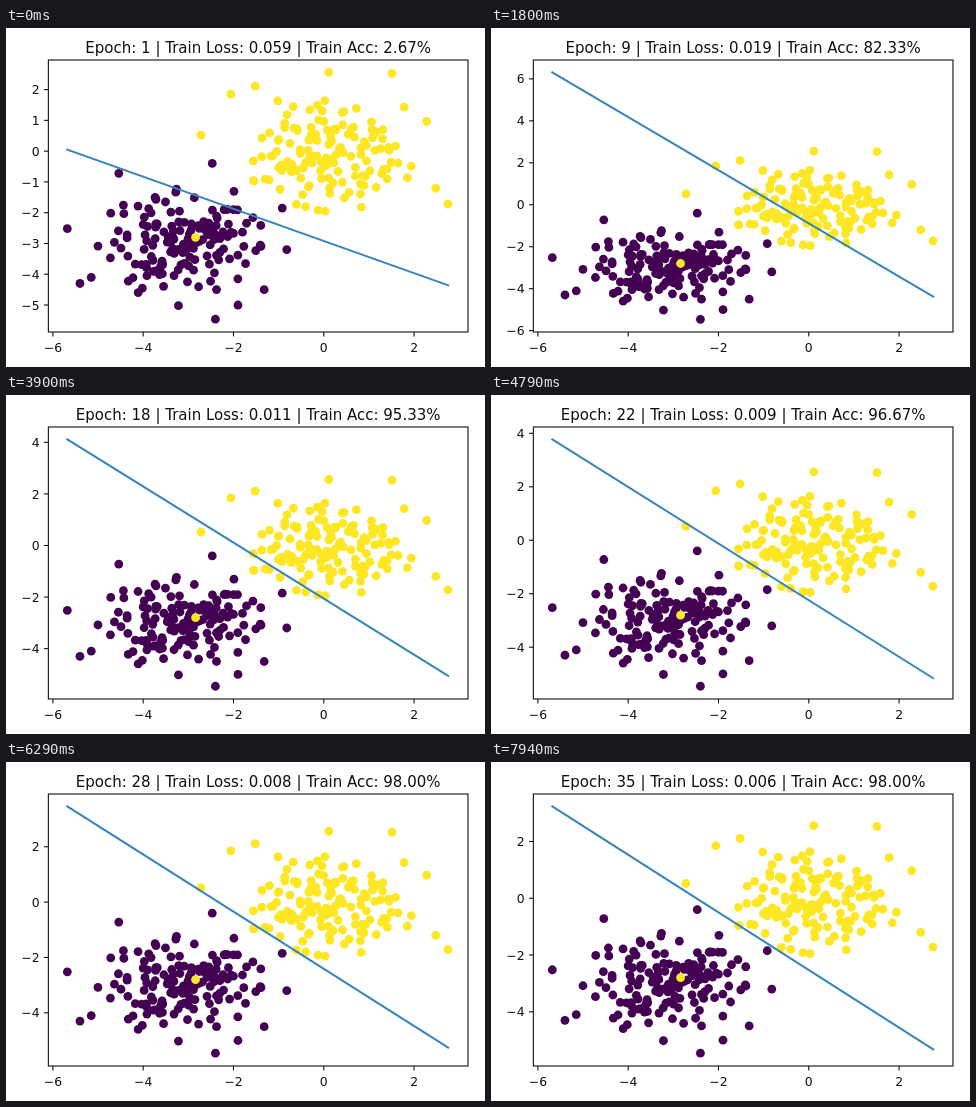
These frames come from a looping animation (479x339 px, 8 s). An HTML page with a canvas:

```html
<!DOCTYPE html>
<html lang="en">
<head>
<meta charset="utf-8">
<title>Training a linear classifier</title>
<style>
  html, body { margin: 0; width: 100%; height: 100%; overflow: hidden; background: #fff; }
  canvas { display: block; }
</style>
</head>
<body>
<canvas id="plot" width="479" height="339"></canvas>
<script>
const ctx = document.getElementById('plot').getContext('2d');

const LOOP = 8000, STEP = 149.67, STEPS_PER_EPOCH = 1.54, STEP_OFFSET = 0.65;
const TOP = 32, BOTTOM = 304, AXES_WIDTH = 419.6;
const X_MIN = -6.1, X_SCALE = 45.15, LINE_X = [-5.68, 2.755];
const DATA_LOW = -5.475, DATA_HIGH = 2.56;
const INK = '#111';
const LABEL_FONT = '12.4px "DejaVu Sans", sans-serif';
const TITLE_FONT = '15px "DejaVu Sans", sans-serif';

// The boundary turns over during the first epochs, then settles smoothly.
const EARLY_LINES = [[0.05, -4.36], [-4.8, -5.3], [-166, -31]];
const ACCURACY_KEYS = [[1, 2.67], [3, 49], [5, 53.33], [9, 82.33], [14, 93.33],
  [22, 96.67], [28, 98], [35, 98]];

function lineEnds(epoch) {
  const decay = 1 / (epoch - 2);
  return EARLY_LINES[epoch - 1] || [2.41 + 27.3 * decay, -5.58 + 8.4 * decay];
}

const lossAt = epoch => 0.2325 / (epoch + 2.95);

function accuracyAt(epoch) {
  const next = Math.max(1, ACCURACY_KEYS.findIndex(([e]) => e >= epoch));
  const [e0, a0] = ACCURACY_KEYS[next - 1], [e1, a1] = ACCURACY_KEYS[next];
  const k = (1 / epoch - 1 / e0) / (1 / e1 - 1 / e0);
  return Math.round((a0 + (a1 - a0) * k) * 3) / 3;
}

function randomSource(seed) {
  return () => {
    seed = (seed * 1664525 + 1013904223) % 4294967296;
    return (seed + 1) / 4294967297;
  };
}

// 150 points: a unit normal cloud plus the stragglers that shape its outline.
function makeCluster(color, center, seed, stragglers) {
  const random = randomSource(seed), points = [...stragglers];
  while (points.length < 150) {
    const radius = Math.sqrt(-2 * Math.log(random()));
    const angle = 2 * Math.PI * random();
    if (radius < 2.05) {
      points.push([center + radius * Math.cos(angle), center + radius * Math.sin(angle)]);
    }
  }
  return { color, points };
}

const clusters = [
  makeCluster('#440154', -3, 11, [
    [-5.68, -2.52], [-5.4, -4.3], [-5.15, -4.1], [-4.54, -0.72], [-2.4, -5.46],
    [-2.47, -0.4], [-0.82, -3.2], [-0.92, -1.85], [-1.9, -5], [-1.32, -4.5]
  ]),
  makeCluster('#fde725', 0, 29, [
    [-2.84, -2.8], [-2.72, 0.52], [-2.06, 1.85], [2.75, -1.72], [2.48, -1.2],
    [2.28, 0.97], [1.51, 2.53], [0.11, 2.56], [-1.52, 2.11], [1.78, 1.43]
  ])
];

const label = (value, decimals = 0) =>
  (value < 0 ? '\u2212' : '') + Math.abs(value).toFixed(decimals);

function ticksBetween(low, high) {
  const rough = (high - low) / 9;
  const power = 10 ** Math.floor(Math.log10(rough));
  const step = power * [1, 2, 2.5, 5, 10].find(s => s * power >= rough);
  const ticks = [];
  for (let i = Math.ceil(low / step); i * step <= high; i++) {
    ticks.push({ value: i * step, text: label(i * step, step % 1 ? 1 : 0) });
  }
  return ticks;
}

function segment(x1, y1, x2, y2) {
  ctx.beginPath();
  ctx.moveTo(x1, y1);
  ctx.lineTo(x2, y2);
  ctx.stroke();
}

function draw(epoch) {
  const [startY, endY] = lineEnds(epoch);
  const min = Math.min(DATA_LOW, startY, endY), max = Math.max(DATA_HIGH, startY, endY);
  const margin = (max - min) * 0.05;
  const low = min - margin, high = max + margin;
  const ticks = ticksBetween(low, high);

  ctx.font = LABEL_FONT;
  const left = 24.1 + Math.max(...ticks.map(t => ctx.measureText(t.text).width));
  const toX = x => left + (x - X_MIN) * X_SCALE;
  const toY = y => TOP + (high - y) / (high - low) * (BOTTOM - TOP);

  ctx.fillStyle = '#fff';
  ctx.fillRect(0, 0, 479, 339);

  for (const { color, points } of clusters) {
    ctx.fillStyle = color;
    for (const [x, y] of points) {
      ctx.beginPath();
      ctx.arc(toX(x), toY(y), 4.4, 0, 2 * Math.PI);
      ctx.fill();
    }
  }

  ctx.strokeStyle = '#3685bc';
  ctx.lineWidth = 2;
  ctx.lineCap = 'square';
  segment(toX(LINE_X[0]), toY(startY), toX(LINE_X[1]), toY(endY));

  ctx.strokeStyle = ctx.fillStyle = INK;
  ctx.lineWidth = 1.1;
  ctx.lineCap = 'butt';
  ctx.strokeRect(left, TOP, AXES_WIDTH, BOTTOM - TOP);

  ctx.textAlign = 'center';
  for (let x = -6; x <= 2; x += 2) {
    segment(toX(x), BOTTOM, toX(x), BOTTOM + 4.4);
    ctx.fillText(label(x), toX(x), 323.5);
  }
  ctx.textAlign = 'right';
  for (const { value, text } of ticks) {
    const y = toY(value);
    segment(left - 4.4, y, left, y);
    ctx.fillText(text, left - 8.8, y + 4.6);
  }

  ctx.font = TITLE_FONT;
  ctx.textAlign = 'center';
  const loss = lossAt(epoch).toFixed(3), accuracy = accuracyAt(epoch).toFixed(2);
  ctx.fillText(`Epoch: ${epoch} | Train Loss: ${loss} | Train Acc: ${accuracy}%`,
    left + AXES_WIDTH / 2, 24.7);
}

// Epochs land on an even grid of steps, so the pauses alternate short and long.
function epochAt(time) {
  const step = Math.floor(time / STEP);
  let epoch = 1;
  while (Math.floor(epoch * STEPS_PER_EPOCH + STEP_OFFSET) <= step) epoch++;
  return epoch;
}

function tick() {
  draw(epochAt(performance.now() % LOOP));
  requestAnimationFrame(tick);
}
tick();
</script>
</body>
</html>
```
